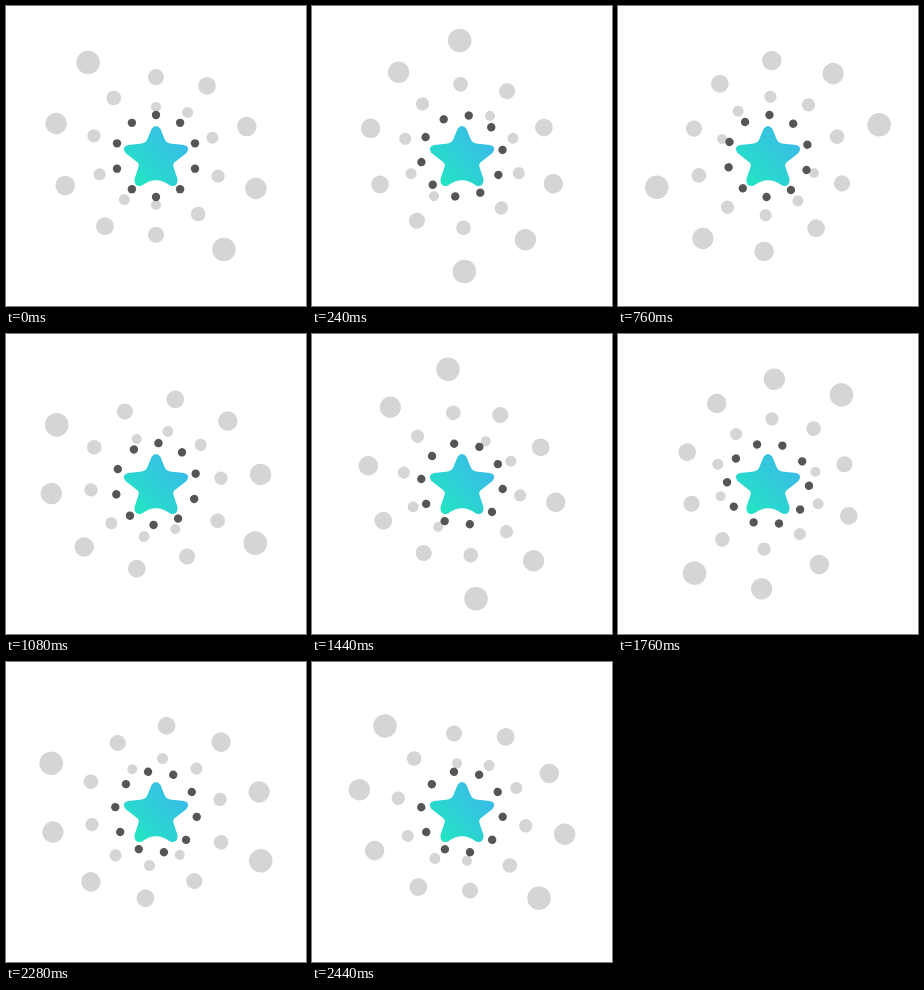
An HTML page that plays this animation: 300 by 300 pixels, repeating every 2480 ms.

```html
<!DOCTYPE html>
<html lang="en">
<head>
<meta charset="utf-8">
<title>Star spinner</title>
<style>
  html, body { margin: 0; width: 100%; height: 100%; overflow: hidden; background: #fff; }
  svg { display: block; width: 100vw; height: 100vh; }
</style>
</head>
<body>
<svg viewBox="0 0 300 300">
  <defs>
    <linearGradient id="fill" gradientUnits="userSpaceOnUse" x1="127" y1="178" x2="178" y2="128">
      <stop offset="0" stop-color="#22e6c3"/>
      <stop offset="1" stop-color="#3bb8ea"/>
    </linearGradient>
  </defs>
  <g id="spiral" fill="#d5d5d5"></g>
  <g id="ring" fill="#555"></g>
  <path fill="url(#fill)" d="M145.5 123 Q150 117 154.5 123 L159 134 Q160.5 137 164 137.5 L178 139
    Q185 141 180.500 147 L169 156 Q166.500 158 167.500 161 L171.500 173 Q172 182 164 179.500
    Q150 169 136 179.500 Q128 182 128.500 173 L132.500 161 Q133.500 158 131 156 L119.500 147
    Q115 141 122 139 L136 137.500 Q139.500 137 141 134 Z"/>
</svg>
<script>
const LOOP = 2480, STEP = 40;
const spiral = document.getElementById('spiral');
const ring = document.getElementById('ring');

function addDot(group, distance, degrees, radius) {
  const dot = document.createElementNS('http://www.w3.org/2000/svg', 'circle');
  const angle = degrees * Math.PI / 180;
  dot.setAttribute('cx', 150 + distance * Math.cos(angle));
  dot.setAttribute('cy', 150 + distance * Math.sin(angle));
  dot.setAttribute('r', radius);
  group.append(dot);
}

// Two logarithmic arms of ten dots, and an even ring of ten
for (let k = 0; k < 10; k++) {
  const angle = 36 * k - 90, distance = 49 * 1.1 ** k;
  addDot(spiral, distance, angle, distance * 0.102);
  addDot(spiral, distance, angle + 180, distance * 0.102);
  addDot(ring, 41, angle, 4.2);
}

// The ring gathers speed through one turn: [ms, degrees]
const ringKeys = [[0, 0], [440, 17.4], [760, 38], [1080, 75.4], [1440, 133],
  [2080, 268], [2440, 348.7], [LOOP, 360]];

function ringAngle(t) {
  const i = ringKeys.findIndex(key => key[0] > t);
  const [t0, a0] = ringKeys[i - 1], [t1, a1] = ringKeys[i];
  return a0 + (a1 - a0) * (t - t0) / (t1 - t0);
}

const rotate = (group, degrees) => group.setAttribute('transform', `rotate(${degrees} 150 150)`);

const start = performance.now();
function draw() {
  const t = Math.floor((performance.now() - start) % LOOP / STEP) * STEP;
  rotate(spiral, 360 * t / LOOP);
  rotate(ring, ringAngle(t));
  requestAnimationFrame(draw);
}
draw();
</script>
</body>
</html>
```
